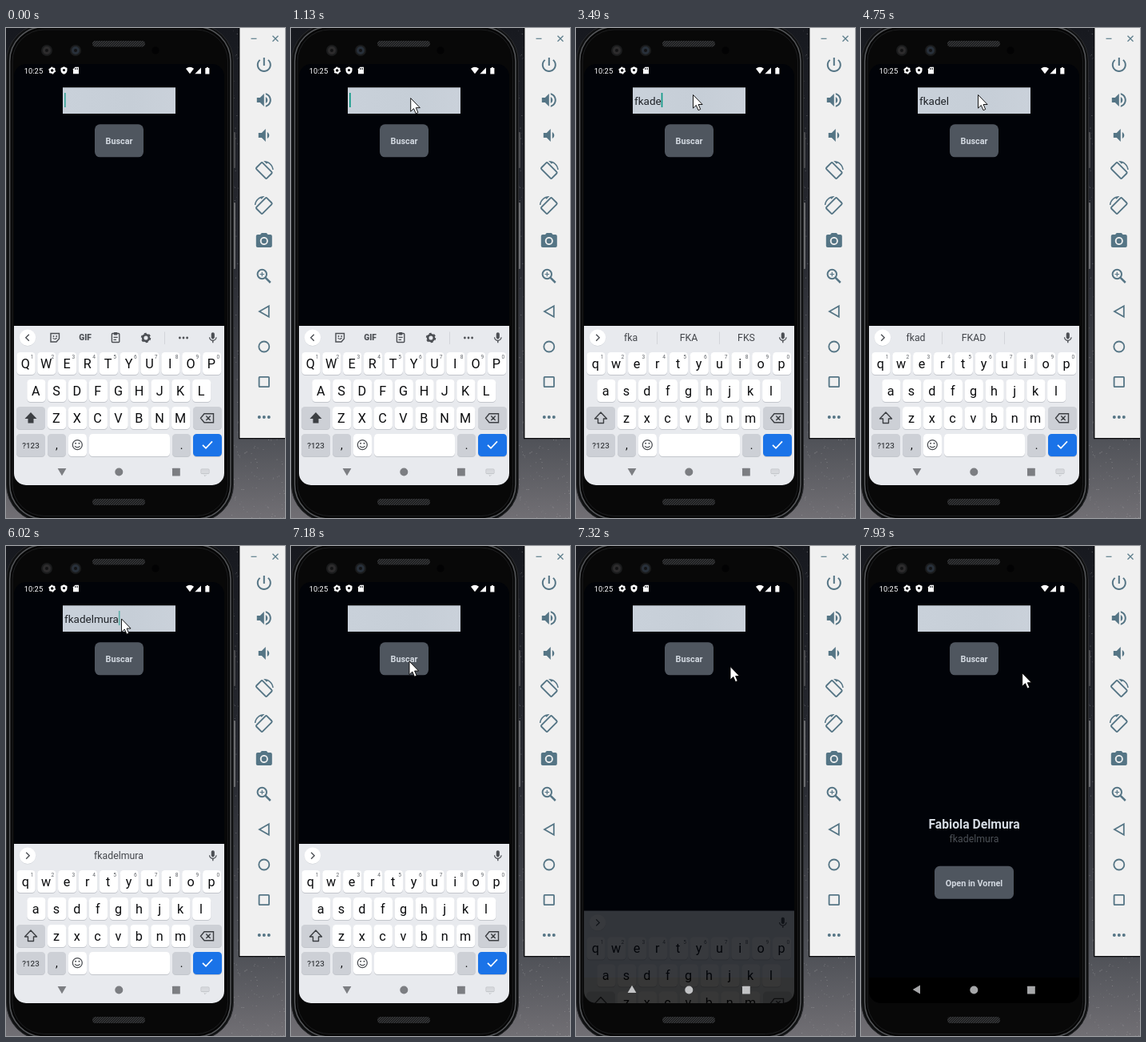
An HTML page that plays this animation: 349x612 px, repeating every 8000 ms.

```html
<!DOCTYPE html>
<html lang="es">
<head>
<meta charset="utf-8">
<title>Buscar</title>
<style>
html, body { margin: 0; width: 100%; height: 100%; overflow: hidden; background: #17191f; }
svg { display: block; width: 349px; height: 612px; font-family: Roboto, sans-serif; }
text { white-space: pre; }
</style>
</head>
<body>
<svg id="stage" viewBox="0 0 349 612" xmlns="http://www.w3.org/2000/svg">
  <defs>
    <linearGradient id="sky" x1="0" y1="0" x2="0" y2="1">
      <stop offset="0" stop-color="#17191f"/><stop offset=".5" stop-color="#2b2d34"/>
      <stop offset=".84" stop-color="#505258"/><stop offset="1" stop-color="#716f74"/>
    </linearGradient>
    <linearGradient id="field" x1="0" y1="0" x2="1" y2="0">
      <stop offset="0" stop-color="#c9d1da"/><stop offset=".6" stop-color="#c6ced7"/><stop offset="1" stop-color="#cad1da"/>
    </linearGradient>
    <clipPath id="screen"><rect x="10" y="45" width="263" height="526" rx="15"/></clipPath>
    <pattern id="mesh" width="3" height="3" patternUnits="userSpaceOnUse">
      <rect width="3" height="3" fill="#323335"/><path d="M0 3L3 0" stroke="#131415"/>
    </pattern>
  </defs>
  <rect width="349" height="612" fill="url(#sky)"/>
  <g id="stars"></g>
  <g id="phone"></g>
  <g clip-path="url(#screen)">
    <rect x="10" y="45" width="263" height="526" fill="#010308"/>
    <rect x="10" y="539" width="263" height="32" fill="#000"/>
    <g id="app"></g>
    <g id="result"></g>
    <g id="keyboard"></g>
    <g id="nav"></g>
  </g>
  <g id="tools"></g>
  <path id="mouse" d="M0 0V16.6L3.8 13 6.5 19.2 9.2 18 6.6 12H11.6Z" fill="#fff" stroke="#000" stroke-width=".9"/>
</svg>
<script>
const LOOP = 8000, HANDLE = 'fkadelmura';
const $ = id => document.getElementById(id);
const put = (id, ...parts) => { $(id).innerHTML = parts.flat(9).join(''); };

const rect = (x, y, w, h, r, fill, more = '') =>
  `<rect x="${x}" y="${y}" width="${w}" height="${h}" rx="${r}" fill="${fill}" ${more}/>`;
const disc = (x, y, r, fill, more = '') => `<circle cx="${x}" cy="${y}" r="${r}" fill="${fill}" ${more}/>`;
const ring = (x, y, r, stroke, w, more = '') => disc(x, y, r, 'none', `stroke="${stroke}" stroke-width="${w}" ${more}`);
const line = (d, stroke, w, more = '') =>
  `<path d="${d}" fill="none" stroke="${stroke}" stroke-width="${w}" ${more}/>`;
const fillPath = (d, fill) => `<path d="${d}" fill="${fill}"/>`;
const label = (s, x, y, size, fill, more = '') =>
  `<text x="${x}" y="${y}" font-size="${size}" fill="${fill}" text-anchor="middle" ${more}>${s}</text>`;
const BOLD = 'font-weight="700"';
// Places a drawing made on a 24-unit grid so that its middle is at x, y.
const icon = (body, x, y, size, flip = 1) =>
  `<g transform="translate(${x} ${y}) scale(${flip * size / 24} ${size / 24}) translate(-12 -12)">${body}</g>`;
const gear = (x, y, r, c) =>
  ring(x, y, r * .62, c, r * .42) +
  ring(x, y, r * .88, c, r * .26, `stroke-dasharray="${r * .46} ${r * .4615}"`);
const dots = (x, y, gap, r, c) => [-1, 0, 1].map(i => disc(x + i * gap, y, r, c)).join('');

// Wallpaper specks
let seed = 11;
const rnd = () => (seed = seed * 16807 % 2147483647) / 2147483647;
put('stars', Array.from({ length: 150 }, (_, i) => {
  const low = i < 100;
  return disc((low ? 270 + rnd() * 79 : 284 + rnd() * 8).toFixed(1), (low ? 513 + rnd() * 99 : rnd() * 513).toFixed(1),
    .5, '#c9c7c8', `opacity="${(.15 + rnd() * .4).toFixed(2)}"`);
}));

// Phone body
const lens = (x, c) => disc(x, 28, 7, '#1b1c1d') + disc(x, 28, 5, c) + disc(x, 28, 2, '#131415');
put('phone',
  rect(284, 130, 3, 45, 1, '#4a4b4e'), rect(284, 218, 3, 83, 1, '#6a6b6e'),
  rect(.5, -5, 284, 622, 47, '#101112', 'stroke="#2b2c2f"'),
  rect(4.7, -1.5, 276.2, 614.5, 43, '#060606', 'stroke="#55575a" stroke-width="1.5"'),
  rect(8, 2, 269.6, 607.5, 40, '#080808', 'stroke="#1e1f21"'),
  lens(51, '#2d2c2d'), lens(87, '#28303a'), disc(187, 28, 4.5, '#020203'),
  rect(108, 16, 66, 7.5, 3.7, 'url(#mesh)'), rect(108, 588, 66, 8, 4, 'url(#mesh)'));

// App and status bar
const W = '#fff';
const button = (s, x, y, w) =>
  rect(x, y, w, 41, 6.5, '#4f565f') + label(s, x + w / 2, y + 24.7, 10.8, '#d3d9e1', BOLD);
put('app',
  label('10:25', 34.5, 56.6, 9.4, W), gear(57.7, 53, 4.4, W),
  fillPath('M72.5 48.3L76.5 50V53Q76.3 56.4 72.5 57.8 68.7 56.4 68.5 53V50Z', W), disc(72.5, 52.6, 1.6, '#01040a'),
  fillPath('M86.5 48.8H91V57.3H84V51.3Z', W), line('M86.5 50V52M88 50V52M89.5 50V52', '#01040a', .7),
  fillPath('M230 57.3L225 50.8Q230 46.8 235 50.8Z', W), fillPath('M236.3 57.2H244V49.4Z', W),
  fillPath('M249.3 50H250.8V49H253V50H254.4V57.4H249.3Z', W),
  rect(71, 74.3, 141, 32.7, 0, 'url(#field)'),
  `<text id="typed" x="73" y="95.6" font-size="13.5" fill="#202429"></text>`,
  rect(73, 81, 1.7, 18, 0, '#109a88', 'id="caret"'),
  button('Buscar', 111, 120.3, 61));
put('result',
  label('Fabiola Delmura', 141.5, 352.8, 15.7, '#d6dce3', BOLD),
  label(HANDLE, 141.5, 370, 12.3, '#4c5056'),
  button('Open in Vornel', 92, 399.8, 99));

// Keyboard
const INK = '#0b0c0e', GREY = '#4c4f54', PALE = '#cdd0d6';
const key = (x, y, w, fill) => rect(x, y + 1, w, 28, 4.5, '#c3c6cc') + rect(x, y, w, 28, 4.5, fill);
const rows = ['qwertyuiop', 'asdfghjkl', 'zxcvbnm'];
const rowX = [25, 37.9, 63.6], PITCH = 25.85;
const each = fn => rows.map((row, r) => [...row].map((ch, i) => fn(ch, rowX[r] + i * PITCH, 405 + r * 34, r, i)));
const letters = up => each((ch, x, y) => label(up ? ch.toUpperCase() : ch, x - .7, y + 19.6, 16.2, INK));
const arrow = 'M31 480L38.5 488H34.5V493.5H27.5V488H23.5Z';
const mic = icon(fillPath('M12 14c1.66 0 3-1.34 3-3V5c0-1.66-1.34-3-3-3S9 3.34 9 5v6c0 1.66 1.34 3 3 3zm5.3-3c0 3-2.54 5.1-5.3 5.1S6.7 14 6.7 11H5c0 3.41 2.72 6.23 6 6.72V21h2v-3.28c3.28-.48 6-3.3 6-6.72h-1.7z', GREY), 258.8, 387, 16.5);
put('keyboard',
  rect(10, 372, 263, 205, 0, '#e8eaee'),
  disc(27, 387.4, 10.2, '#cfd2d7'), disc(27, 386.8, 10.2, '#fff'), mic,
  `<g id="bar">`,
  line('M28.8 382.8L24.8 386.8 28.8 390.8', GREY, 1.4),
  line('M56 381.5H66.5V388L63 392H56Z', GREY, 1.4), line('M58.7 387Q61 390 63.5 387', GREY, 1.2),
  disc(59.5, 385, .9, GREY), disc(63.2, 385, .9, GREY),
  label('GIF', 99, 390.4, 10.2, GREY, 'font-weight="900"'),
  rect(132.4, 381.5, 9.4, 11, 1, 'none', `stroke="${GREY}" stroke-width="1.4"`), rect(134.8, 380, 4.6, 3.4, 1, GREY),
  line('M134.5 386.3H139.7M134.5 389.3H138', GREY, 1.2),
  gear(175, 387, 6.2, GREY), line('M198.5 379.5V395', '#d3d5da', 1), dots(222, 387, 4.6, 1.4, GREY),
  `</g><g id="hints">`,
  line('M25.2 382.8L29.2 386.8 25.2 390.8', GREY, 1.4),
  [68.5, 141, 213].map((x, i) => label('', x, 391.2, 12.3, '#43464b', `id="hint${i}"`)),
  line('M101.5 379.5V395M179.5 379.5V395', '#d3d5da', 1, 'id="rules"'),
  `</g>`,
  each((ch, x, y, r, i) => key(x - 11.6, y, 23.2, '#fff') +
    (r ? '' : label((i + 1) % 10, x + 7.6, y + 8, 6.6, '#5f6368'))),
  key(13, 473, 36, PALE), key(234, 473, 36, PALE),
  `<g id="upper">`, letters(true), fillPath(arrow, '#3c3f43'), `</g>`,
  `<g id="lower">`, letters(false), line(arrow, '#3c3f43', 1.4, 'stroke-linejoin="round"'), `</g>`,
  line('M243.5 487.3L248 481.8H259.5V492.8H248ZM250.3 484.6L255.7 490M255.7 484.6L250.3 490', '#3c3f43', 1.4),
  key(13, 507, 36, PALE), key(52, 507, 23, PALE), key(78, 507, 23, '#fff'),
  key(104, 507, 101, '#fff'), key(208, 507, 23, PALE), key(234, 507, 36, '#1a73e8'),
  label('?123', 31, 524.5, 9.8, '#3c3f43', 'font-weight="500"'),
  label(',', 63.5, 525.5, 14, INK), label('.', 219.5, 525.5, 14, INK),
  ring(89.3, 520.6, 6, GREY, 1.3), disc(87.1, 518.8, 1, GREY), disc(91.5, 518.8, 1, GREY),
  line('M86.1 522.1Q89.3 525.8 92.5 522.1', GREY, 1.3),
  line('M246 520.8L250 524.8 258 516.4', '#fff', 1.7));
put('nav',
  `<g id="back">`, fillPath('M-5.3 0L4 -5.4V5.4Z', 'currentColor'), `</g>`,
  disc(141.3, 554.5, 5, 'currentColor'), rect(208, 549.7, 9.8, 9.8, .6, 'currentColor'),
  `<g id="hide">`, rect(244, 551, 10, 5.6, .8, 'none', 'stroke="#b4b6ba" stroke-width=".8"'),
  line('M245.5 552.8H253M245.5 554.8H253', '#a0a2a6', .9, 'stroke-dasharray="1 1"'),
  line('M247.7 558.3L249 559.6 250.3 558.3', '#b4b6ba', .9), `</g>`);

// Side toolbar
const T = '#557585', TX = 322.8, tool = (d, y, more = '', flip = 1) => icon(fillPath(d, T) + more, TX, y, 24, flip);
const tilt = (y, flip) => tool('M16.48 2.52c3.27 1.55 5.61 4.72 5.97 8.48h1.5C23.44 4.84 18.29 0 12 0l-.66.03 3.81 3.81 1.33-1.32z', y,
  rect(6.5, 2.7, 11, 18.6, 1.5, 'none', `stroke="${T}" stroke-width="1.9" transform="rotate(-45 12 12)"`), flip);
put('tools',
  rect(291, -1, 60, 514.3, 0, '#0b0c0e'), rect(292.4, -1, 60, 513, 0, '#f0f0f0'),
  line('M306.5 13.3H313.5', '#5f7f8d', 1.2), line('M333.5 9.7L340.5 16.7M340.5 9.7L333.5 16.7', '#5f7f8d', 1.3),
  tool('M13 3h-2v10h2V3zm4.83 2.17l-1.42 1.42C17.99 7.86 19 9.81 19 12c0 3.87-3.13 7-7 7s-7-3.13-7-7c0-2.19 1.01-4.14 2.58-5.42L6.17 5.17C4.23 6.82 3 9.26 3 12c0 4.97 4.03 9 9 9s9-4.03 9-9c0-2.74-1.23-5.18-3.17-6.83z', 46),
  tool('M3 9v6h4l5 5V4L7 9H3zm13.5 3c0-1.77-1.02-3.29-2.5-4.03v8.05c1.48-.73 2.5-2.25 2.5-4.02zM14 3.23v2.06c2.89.86 5 3.54 5 6.71s-2.11 5.85-5 6.71v2.06c4.01-.91 7-4.49 7-8.77s-2.99-7.86-7-8.77z', 90),
  tool('M18.5 12c0-1.77-1.02-3.29-2.5-4.03v8.05c1.48-.73 2.5-2.25 2.5-4.02zM5 9v6h4l5 5V4L9 9H5z', 134),
  tilt(178, 1), tilt(222, -1),
  tool('M9 2L7.17 4H4c-1.1 0-2 .9-2 2v12c0 1.1.9 2 2 2h16c1.1 0 2-.9 2-2V6c0-1.1-.9-2-2-2h-3.17L15 2H9zm3 15c-2.76 0-5-2.24-5-5s2.24-5 5-5 5 2.24 5 5-2.24 5-5 5z', 266, disc(12, 12, 3.2, T)),
  ring(320.3, 307.5, 5.7, T, 2), line('M324.6 311.8L330.8 318', T, 2.5), line('M317.5 307.5H323.1M320.3 304.7V310.3', T, 1.2),
  line('M317 354L328.8 347.3V360.7Z', T, 1.8), ring(TX, 398, 6.5, T, 1.8),
  rect(316.6, 435.8, 12.4, 12.4, .8, 'none', `stroke="${T}" stroke-width="1.8"`), dots(TX, 486, 6, 2, T));

// Timeline: [start, value], held until the next entry
const typing = [[0, 0], [2460, 1], [2530, 2], [3080, 3], [3350, 4], [3490, 5], [4200, 6],
  [5210, 7], [5280, 8], [5420, 9], [5490, 10], [7180, 0]];
const blink = [[0, .75], [500, 0], [990, 1], [1540, 0], [2000, 1], [4020, 0], [4200, 1], [4750, 0],
  [5210, 1], [6020, .55], [6090, 0], [6710, 1], [7180, 0]];
const hints = [[0, ['', '', '']], [2800, ['fk', 'FK', 'FKS']], [3420, ['fka', 'FKA', 'FKS']],
  [4200, ['fkad', 'FKAD', '']], [5350, ['', 'fkadelmu', '']], [5690, ['', HANDLE, '']], [7180, ['', '', '']]];
// Pointer moves: start, end, then points evenly spaced in time
const moves = [
  [430, 1200, [263, 424], [256, 340], [222, 225], [180, 135], [153, 92], [147, 84]],
  [1270, 1540, [148, 77], [148, 72], [146.5, 80], [146.5, 83.5]],
  [6020, 6440, [144.5, 91], [128, 104], [113, 124], [109, 140], [117, 147], [129, 141], [135, 136]],
  [6710, 6910, [139, 134], [144, 135], [147, 136]],
  [7180, 7530, [148, 144], [172, 146], [193, 150.5], [198, 153], [199, 154], [200, 155]],
  [7860, 7930, [201, 157], [201.7, 158.7]]
];
const STEP = 70, HIDE = 7180;
const slide = [0, .14, .42, .75, 1], turn = [-90, -90, 90, 45, 12, 0];

const at = (list, t) => list.findLast(e => e[0] <= t)[1];
const clampAt = (list, i) => list[Math.max(0, Math.min(list.length - 1, i))];
const show = (id, on) => $(id).setAttribute('visibility', on ? 'visible' : 'hidden');

function pointer(t) {
  const leg = moves.findLast(m => m[0] <= t);
  if (!leg) return null;
  const [start, end, ...pts] = leg;
  const n = Math.round((end - start) / STEP);
  const k = Math.min(n, Math.floor((t - start) / (end - start) * n + 1e-6));
  const u = k / n * (pts.length - 1), i = Math.min(pts.length - 2, Math.floor(u)), f = u - i;
  return pts[i].map((v, a) => v + (pts[i + 1][a] - v) * f);
}

function draw(t) {
  const typed = $('typed'), n = at(typing, t);
  typed.textContent = HANDLE.slice(0, n);
  $('caret').setAttribute('x', 73 + (n ? typed.getComputedTextLength() : 0));
  $('caret').setAttribute('opacity', at(blink, t));

  show('upper', t < 2530);
  show('lower', t >= 2530);
  show('bar', t < 2800);
  show('hints', t >= 2800);
  at(hints, t).forEach((s, i) => { $('hint' + i).textContent = s; });
  $('rules').setAttribute('opacity', t < 5350 ? 1 : 0);

  const k = Math.floor((t - HIDE) / STEP), s = clampAt(slide, k);
  $('keyboard').setAttribute('transform', `translate(0 ${199 * s})`);
  $('keyboard').setAttribute('opacity', (1 - s) ** 2.8);
  $('back').setAttribute('transform', `translate(70 554) rotate(${clampAt(turn, k)})`);
  $('nav').setAttribute('color', k < 1 ? '#7c7e82' : k < 4 ? '#c2c3c5' : '#a6a7a9');
  show('hide', k < 1);
  show('result', t >= 7930);

  const p = pointer(t);
  show('mouse', p);
  if (p) $('mouse').setAttribute('transform', `translate(${p[0]} ${p[1]})`);
}

const began = performance.now();
function tick() {
  draw((performance.now() - began) % LOOP);
  requestAnimationFrame(tick);
}
tick();
</script>
</body>
</html>
```
